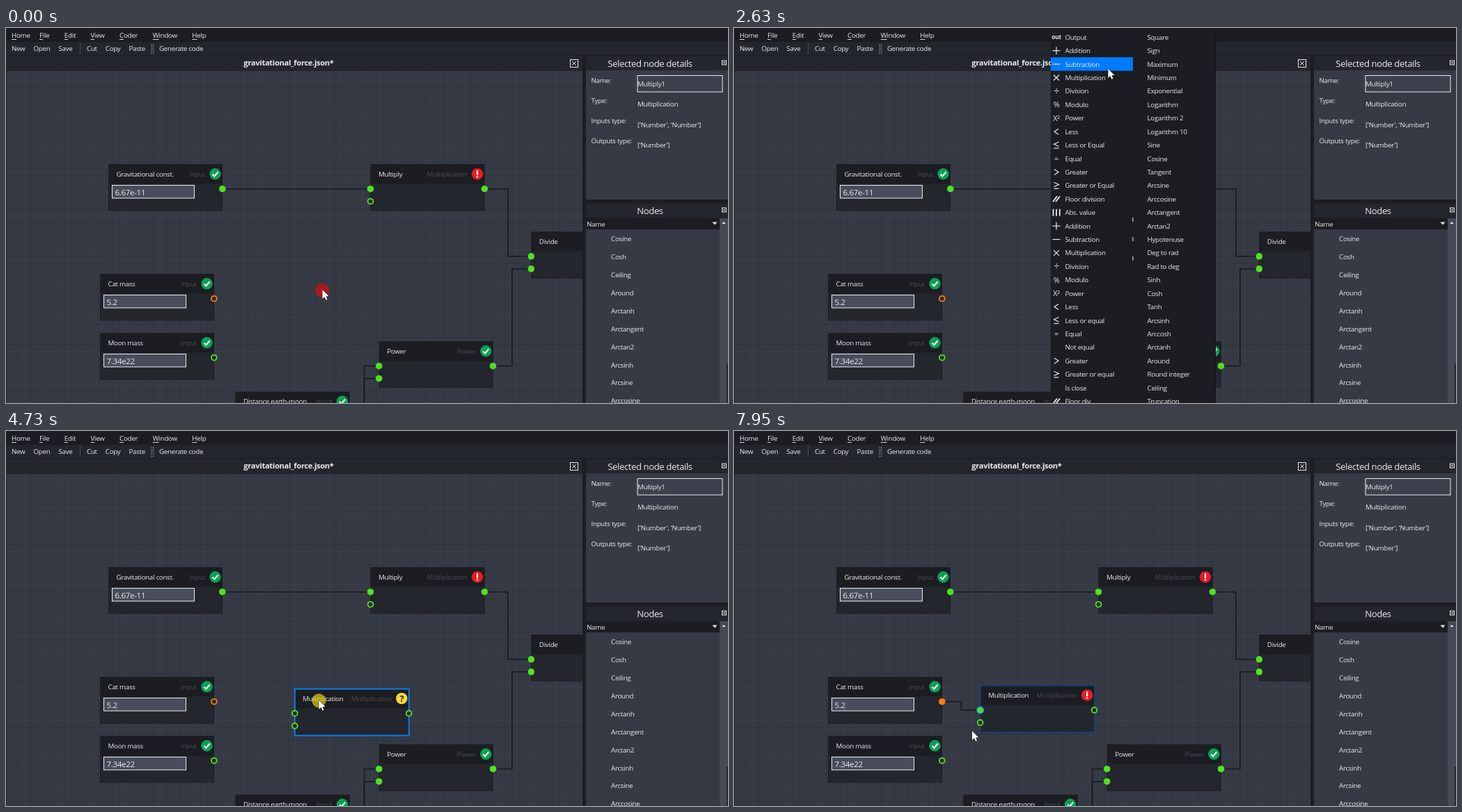
These frames come from a looping animation (1037x540 px, 8 s). An HTML page with a canvas:

```html
<!DOCTYPE html>
<html lang="en">
<head>
<meta charset="utf-8">
<title>Node editor</title>
<style>
html, body { margin: 0; width: 100%; height: 100%; overflow: hidden; background: #363a45; }
canvas { display: block; width: 1037px; height: 540px; }
</style>
</head>
<body>
<canvas id="stage" width="1037" height="540"></canvas>
<script>
const ctx = document.getElementById('stage').getContext('2d');
const LOOP = 8000, STEP = 70;
const DARK = '#1b1d22', PANEL = '#23262d', SURFACE = '#363a45', FIELD = '#474d5b', INK = '#e9eaec';
const GREEN = '#4fe31c', ORANGE = '#ff7d0a', BLUE = '#0a7cf0', DIM_BLUE = '#0d4585';

// Each move ends at a point; ease holds the ease-out power for x and y
const POINTER = {
  start: [454.5, 377],
  moves: [
    { from: 1330, to: 1690, at: [551, 18], ease: [4, 4] },
    { from: 2350, to: 2970, at: [533, 72], ease: [2, 2] },
    { from: 3770, to: 4530, at: [504, 391], ease: [2, 2] },
    { from: 4660, to: 5290, at: [435, 387], ease: [7, 7] },
    { from: 5490, to: 6190, at: [298, 390], ease: [2, 2] },
    { from: 6720, to: 7410, at: [353, 399], ease: [5.6, 20] },
    { from: 7950, to: 7950, at: [342, 432], ease: [1, 1] },
  ],
};
const DRAG = {
  start: [454, 377],
  moves: [
    { from: 4660, to: 5290, at: [359.5, 369.6], ease: [2.4, 7] },
    { from: 5490, to: 5490, at: [353.7, 366.4], ease: [1, 1] },
  ],
};
const PRESSES = [[3170, 3240], [4660, 5490], [6390, 6520], [7550, 7620]];

const gravity = { x: 147, y: 196.2, title: 'Gravitational const.', type: 'Input', status: 'ok', value: '6.67e-11' };
const multiply = { x: 523.5, y: 196.2, title: 'Multiply', type: 'Multiplication', status: 'bad' };
const divide = { x: 754.3, y: 293.3, title: 'Divide', type: 'Division' };
const cat = { x: 135, y: 354.2, title: 'Cat mass', type: 'Input', status: 'ok', value: '5.2', color: ORANGE };
const moon = { x: 135, y: 439.2, title: 'Moon mass', type: 'Input', status: 'ok', value: '7.34e22' };
const power = { x: 535.7, y: 451.2, title: 'Power', type: 'Power', status: 'ok' };
const distance = { x: 329.5, y: 523.7, title: 'Distance earth-moon', type: 'Input', status: 'ok' };
const NODES = [gravity, multiply, divide, cat, moon, power, distance];
const LINKS = [[gravity, multiply, 0], [multiply, divide, 0], [power, divide, 1],
  [distance, power, 0], [distance, power, 1]];

const OPS = ['Output', 'Addition', 'Subtraction', 'Multiplication', 'Division', 'Modulo', 'Power',
  'Less', 'Less or Equal', 'Equal', 'Greater', 'Greater or Equal', 'Floor division', 'Abs. value',
  'Addition', 'Subtraction', 'Multiplication', 'Division', 'Modulo', 'Power', 'Less',
  'Less or equal', 'Equal', 'Not equal', 'Greater', 'Greater or equal', 'Is close', 'Floor div.'];
const FUNCS = ['Square', 'Sign', 'Maximum', 'Minimum', 'Exponential', 'Logarithm', 'Logarithm 2',
  'Logarithm 10', 'Sine', 'Cosine', 'Tangent', 'Arcsine', 'Arccosine', 'Arctangent', 'Arctan2',
  'Hypotenuse', 'Deg to rad', 'Rad to deg', 'Sinh', 'Cosh', 'Tanh', 'Arcsinh', 'Arccosh',
  'Arctanh', 'Around', 'Round integer', 'Ceiling', 'Truncation'];
const SYMBOLS = { Division: '÷', Modulo: '%', Power: 'X²', Equal: '=' };
const NODE_LIST = ['Cosine', 'Cosh', 'Ceiling', 'Around', 'Arctanh', 'Arctangent', 'Arctan2',
  'Arcsinh', 'Arcsine', 'Arccosine'];

const within = (t, a, b) => t >= a && t < b;

// Progress in held steps; the first step already shows movement
function progress(t, from, to) {
  if (t < from) return 0;
  if (t >= to) return 1;
  return (Math.floor((t - from) / STEP) + 1) * STEP / (to - from + STEP);
}

function follow({ start, moves }, t) {
  return moves.reduce((pos, { from, to, at, ease }) => {
    const left = 1 - Math.min(1, progress(t, from, to));
    return pos.map((v, i) => at[i] + (v - at[i]) * left ** ease[i]);
  }, start);
}

function rect(x, y, w, h, color) {
  ctx.fillStyle = color;
  ctx.fillRect(x, y, w, h);
}

function frame(x, y, w, h, color, width = 1) {
  ctx.strokeStyle = color;
  ctx.lineWidth = width;
  ctx.strokeRect(x, y, w, h);
}

function line(color, width, ...pts) {
  ctx.strokeStyle = color;
  ctx.lineWidth = width;
  ctx.beginPath();
  pts.forEach(([x, y]) => ctx.lineTo(x, y));
  ctx.stroke();
}

function shape(color, ...pts) {
  ctx.fillStyle = color;
  ctx.beginPath();
  pts.forEach(([x, y]) => ctx.lineTo(x, y));
  ctx.fill();
}

function disc(x, y, r, color) {
  ctx.fillStyle = color;
  ctx.beginPath();
  ctx.arc(x, y, r, 0, Math.PI * 2);
  ctx.fill();
}

// y is the middle of the capitals
function text(str, x, y, { size = 9.8, color = INK, align = 'left', weight = 400 } = {}) {
  ctx.font = `${weight} ${size}px "Open Sans", "Noto Sans", sans-serif`;
  ctx.letterSpacing = `${-0.03 * size}px`;
  ctx.textAlign = align;
  ctx.fillStyle = color;
  ctx.fillText(str, x, y + size * 0.36);
}

function labels(names, x, y, gap, mnemonic) {
  for (const name of names) {
    text(name, x, y);
    if (mnemonic) rect(x, y + 5.3, ctx.measureText(name[0]).width, 0.9, INK);
    x += ctx.measureText(name).width + gap;
  }
}

function column(names, x, y, pitch) {
  names.forEach((name, i) => text(name, x, y + i * pitch));
}

function closeBox(x, y, s) {
  frame(x, y, s, s, INK);
  const m = s * 0.25;
  line(INK, 1, [x + m, y + m], [x + s - m, y + s - m]);
  line(INK, 1, [x + s - m, y + m], [x + m, y + s - m]);
}

function drawGrid() {
  const major = 48.65, minor = major / 5, x0 = 26.3, y0 = 76.2;
  const lines = (gap, color) => {
    for (let x = x0 % gap; x < 828; x += gap) line(color, 1, [x, 62], [x, 540]);
    for (let y = y0 % gap; y < 540; y += gap) line(color, 1, [0, y], [828, y]);
  };
  rect(0, 62, 828, 478, SURFACE);
  lines(minor, 'rgba(24,27,34,.12)');
  ctx.setLineDash([1.3, 2.6]);
  lines(major, '#4f5563');
  ctx.setLineDash([]);
}

const inPort = (n, slot) => [n.x, n.y + 35.5 + slot * 18];
const outPort = n => [n.x + 163.8, n.y + 35.5];

function port([x, y], filled, color = GREEN, ring) {
  if (ring) disc(x, y, 5.6, ring);
  disc(x, y, ring ? 4 : 4.8, color);
  if (!filled) disc(x, y, 2.9, PANEL);
}

function wire(from, to, slot) {
  const a = outPort(from), b = inPort(to, slot), mid = (a[0] + b[0]) / 2;
  line('#17191e', 1.6, a, [mid, a[1]], [mid, b[1]], b);
}

function badge(kind, x, y) {
  disc(x, y, 8.2, { ok: '#0ba254', bad: '#ea1c22', ask: '#ffd83a', wait: '#f3b477' }[kind]);
  if (kind === 'ok') line('#fff', 2.1, [x - 4, y + 0.3], [x - 1.2, y + 3.2], [x + 4.2, y - 3]);
  if (kind === 'bad') {
    rect(x - 1.1, y - 5.2, 2.2, 6.8, '#fff');
    disc(x, y + 4, 1.3, '#fff');
  }
  if (kind === 'ask') text('?', x, y, { size: 13, color: '#26221a', align: 'center', weight: 700 });
}

function drawNode({ x, y, title, type, status, value, border, shift = 0 }) {
  ctx.save();
  ctx.beginPath();
  ctx.rect(x, y, 164, 67.3);
  ctx.clip();
  rect(x, y, 164, 67.3, PANEL);
  rect(x, y, 164, 28, DARK);
  frame(x + 0.5, y + 0.5, 163, 66.3, DARK);
  text(title, x + 11.5, y + 14);
  text(type, x + 139 + shift, y + 14, { color: '#484b54', align: 'right' });
  if (status) badge(status, x + 153.5 + shift, y + 14);
  if (value) {
    rect(x + 5, y + 30, 118, 19, FIELD);
    frame(x + 5.5, y + 30.3, 118, 18.5, '#eceded');
    text(value, x + 9.5, y + 40.5, { size: 11.6 });
  }
  ctx.restore();
  if (border) frame(x, y + 0.3, 164, 67, border, border === BLUE ? 2 : 1.5);
}

function drawPorts(node, links, t) {
  const pending = node === cat && t >= 6390;
  port(outPort(node), pending || links.some(([from]) => from === node), node.color);
  if (node.type === 'Input') return;
  for (const slot of [0, 1]) {
    const linked = links.some(([, to, s]) => to === node && s === slot);
    port(inPort(node, slot), linked, GREEN, slot === 0 && node.ring);
  }
}

function drawGraph(t, [px, py]) {
  const hovers = n => t >= 3310 && within(px, n.x - 4, n.x + 168) && within(py, n.y, n.y + 67);
  const nodes = [...NODES], links = [...LINKS];
  cat.border = hovers(cat) && DIM_BLUE;

  if (t >= 3240) {
    const [x, y] = follow(DRAG, t);
    const fresh = t < 3310, reached = t >= 7410;
    const product = { x, y, title: 'Multiplication', type: 'Multiplication',
      status: fresh ? 'wait' : t >= 7550 ? 'bad' : 'ask', shift: fresh ? 14.5 : 0,
      ring: reached && '#2089e8' };
    product.border = within(t, 4660, 6390) ? BLUE : (reached || hovers(product)) && DIM_BLUE;
    nodes.push(product);
    if (t >= 7550) links.push([cat, product, 0]);
  }

  ctx.save();
  ctx.beginPath();
  ctx.rect(0, 62, 828, 478);
  ctx.clip();
  links.forEach(link => wire(...link));
  for (const node of nodes) {
    drawNode(node);
    drawPorts(node, links, t);
  }
  ctx.restore();
}

function drawBars() {
  rect(0, 0, 1037, 20, DARK);
  rect(0, 20, 1037, 19.5, PANEL);
  rect(0, 39, 1037, 1, DARK);
  labels(['Home'], 8, 10.7, 0, true);
  labels(['File', 'Edit', 'View', 'Coder', 'Window', 'Help'], 48, 10.7, 21.5, true);
  labels(['New', 'Open', 'Save'], 8, 29.7, 12);
  labels(['Cut', 'Copy', 'Paste'], 116, 29.7, 12);
  labels(['Generate code'], 220, 29.7, 0);
  rect(106, 21, 1, 17, '#454a55');
  for (let y = 23; y < 37; y += 2.6) {
    rect(208.5, y, 1.3, 1.4, '#8b8f98');
    rect(211, y, 1.3, 1.4, '#8b8f98');
  }
  rect(0, 40, 828, 22, PANEL);
  text('gravitational_force.json*', 406, 50.3, { size: 11.2, weight: 700, align: 'center' });
  closeBox(810.5, 45.5, 11);
  rect(0, 0, 1, 540, DARK);
}

function drawDocks() {
  const dock = (title, y) => {
    rect(833, y, 204, 21, PANEL);
    text(title, 925, y + 10.5, { size: 13.1, align: 'center' });
    closeBox(1028.5, y + 6.5, 6);
  };
  rect(828, 40, 209, 500, DARK);
  dock('Selected node details', 40.5);
  rect(833, 61, 204, 186, SURFACE);
  column(['Name:', 'Type:', 'Inputs type:', 'Outputs type:'], 840.5, 75.5, 29.1);
  rect(907, 68, 122, 24, '#3b404c');
  frame(907, 68.5, 122, 23.5, '#eceded');
  column(['Multiply1', 'Multiplication', "['Number', 'Number']", "['Number']"], 907, 80.8, 29.1);

  dock('Nodes', 252.5);
  rect(833, 290, 192, 250, SURFACE);
  text('Name', 834, 282.8);
  shape(INK, [1014.5, 279.5], [1021.5, 279.5], [1018, 283.5]);
  rect(1025, 274, 12, 266, '#454a56');
  shape(INK, [1028.5, 282], [1033.5, 282], [1031, 279]);
  rect(1035, 483, 1.5, 57, DARK);
  column(NODE_LIST, 869, 303.7, 25.9);
}

function opIcon(name, y) {
  const x = 463, kind = name.toLowerCase();
  const stroke = (...pts) => line(INK, 1.2, ...pts.map(([a, b]) => [x + a, y + b]));
  const side = kind.startsWith('less') ? 1 : -1;
  if (kind === 'output') text('out', x, y, { size: 8.4, weight: 700, align: 'center' });
  else if (kind === 'addition' || kind === 'subtraction') {
    stroke([-5.5, 0], [5.5, 0]);
    if (kind === 'addition') stroke([0, -5.5], [0, 5.5]);
  } else if (kind === 'multiplication') {
    stroke([-4, -4], [4, 4]);
    stroke([4, -4], [-4, 4]);
  } else if (kind.startsWith('floor')) {
    for (const dx of [-2, 2]) line(INK, 1.8, [x + dx - 3, y + 4], [x + dx + 3, y - 4]);
  } else if (kind.startsWith('abs')) {
    for (const dx of [-4.5, 0, 4.8]) line(INK, 1.8, [x + dx, y - 5], [x + dx, y + 5]);
  } else if (kind.endsWith('or equal')) {
    stroke([3.5 * side, -4.5], [-3.5 * side, -1.3], [3.5 * side, 2]);
    stroke([-3.5, 4.5], [3.5, 4.5]);
  } else if (kind === 'less' || kind === 'greater') {
    stroke([3 * side, -4], [-3 * side, 0], [3 * side, 4]);
  } else if (SYMBOLS[name]) {
    text(SYMBOLS[name], x, y, { size: name === 'Division' ? 14 : 11, align: 'center' });
  }
}

function drawMenu(t, [, py]) {
  if (!within(t, 130, 3240)) return;
  const pitch = 19.42;
  ctx.save();
  ctx.globalAlpha = progress(t, 130, 340);
  rect(455, 0, 237, 540, DARK);
  rect(691, 0, 1, 540, '#121317');
  if (t >= 1330) {
    const row = Math.max(0, Math.floor((py - 3.3) / pitch));
    rect(455, 3.3 + row * pitch, 118, pitch, '#007bff');
  }
  OPS.forEach((name, i) => opIcon(name, 13.2 + i * pitch));
  column(OPS, 475.5, 13.2, pitch);
  column(FUNCS, 593.5, 13.2, pitch);
  for (let y = 273; y < 330; y += 28) rect(572.3, y, 1.2, 6, '#cfd1d5');
  ctx.restore();
}

function drawPointer(t, [x, y]) {
  if (t < 200) disc(x - 0.3, y + 1, 10, 'rgba(196,18,22,.82)');
  if (PRESSES.some(([a, b]) => within(t, a, b))) disc(x, y + 0.5, 10, 'rgba(220,198,20,.72)');
  const arrow = [[0, 0], [0, 13], [3, 10.2], [5.1, 14.8], [7.1, 13.9], [5.1, 9.4], [9.2, 9.2]]
    .map(([a, b]) => [x + a, y + b]);
  line('rgba(20,20,24,.75)', 1.2, ...arrow, arrow[0]);
  shape('#fff', ...arrow);
}

function draw(t) {
  const pointer = follow(POINTER, t);
  drawGrid();
  drawGraph(t, pointer);
  drawBars();
  drawDocks();
  drawMenu(t, pointer);
  drawPointer(t, pointer);
}

let start;
function tick(now) {
  start ??= now;
  draw((now - start) % LOOP);
  requestAnimationFrame(tick);
}
requestAnimationFrame(tick);
</script>
</body>
</html>
```
